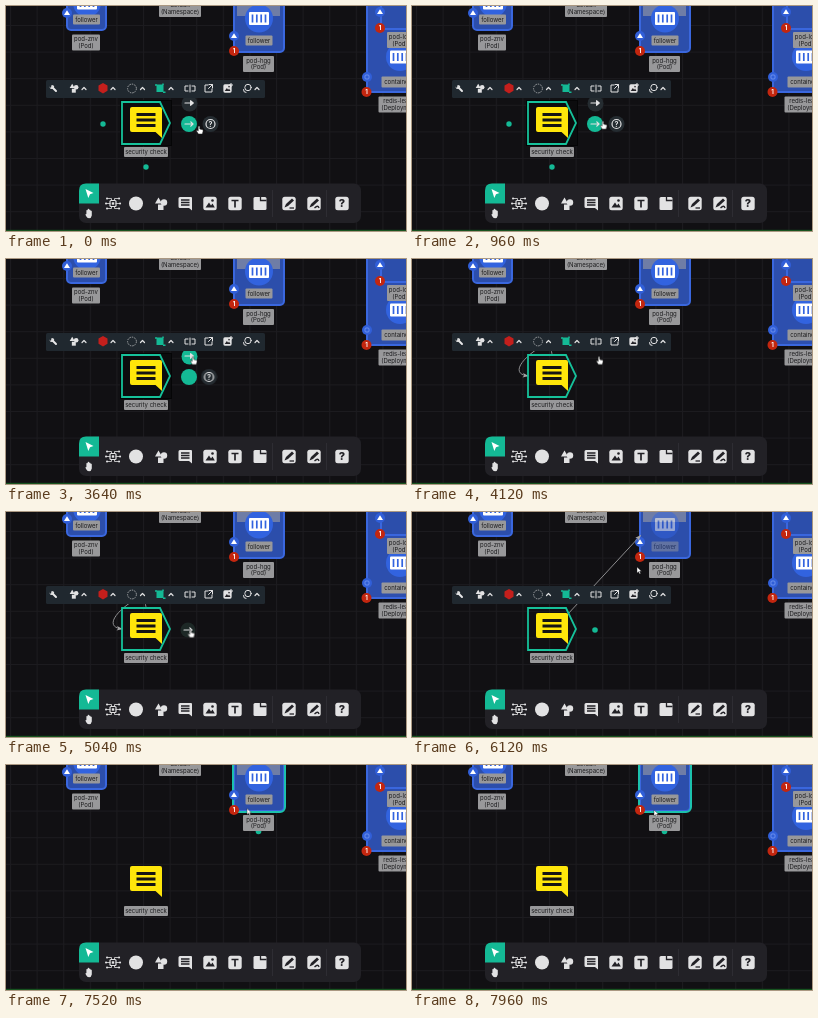
Write an HTML page that moves like this. It is 400 by 225 pixels and loops after 8000 ms.

```html
<!DOCTYPE html>
<html lang="en">
<head>
<meta charset="utf-8">
<title>Security check diagram</title>
<style>
html, body { margin: 0; width: 100%; height: 100%; overflow: hidden; background: #111013; }
svg { display: block; width: 100vw; height: 100vh; }
text { font: 6px Inter, sans-serif; fill: #1b1b1d; text-anchor: middle; }
.chip { fill: #98989a; }
.ns { fill: #2d4fae; stroke: #3a67de; stroke-width: 2; }
.pod { fill: #2c4eab; stroke: #3a67de; stroke-width: 2; }
.line { fill: none; stroke: #e2e2e3; stroke-width: 1.2; stroke-linecap: round; stroke-linejoin: round; }
.white { fill: #e2e2e3; }
.ink { fill: none; stroke: #222126; stroke-width: 1.3; }
.green { fill: #14b995; }
.dark { fill: #252c31; }
.wire { fill: none; stroke: #8d8d8f; stroke-width: 1; }

/* One 8 s timeline; hard changes use step-end */
.t { animation: 8s step-end infinite; }
.menu { animation-name: menu; }
.ends { animation-name: ends; }
.tip { animation-name: tip; }
.hover { animation-name: hover; animation-timing-function: linear; }
.arrow { animation-name: arrow; }
.help { animation-name: help; }
.loop { animation-name: loop; }
.handle { animation-name: handle; }
.dot { animation-name: dot; }
.edge { animation-name: edge, drag; animation-timing-function: step-end, linear; }
.dim { animation-name: dim; animation-timing-function: linear; }
.picked { animation-name: picked; }
.tools { animation-name: tools; }
.hand { animation-name: hand; }
.ptr { animation-name: ptr; }
.cursor { animation-name: move; animation-timing-function: ease-in-out; }

@keyframes menu { 0% { opacity: 1 } 50.5%, 100% { opacity: 0 } }
@keyframes ends { 0% { opacity: 1 } 42%, 100% { opacity: 0 } }
@keyframes tip { 0% { opacity: 0 } 14.5% { opacity: 1 } 40.5%, 100% { opacity: 0 } }
@keyframes hover { 0%, 13% { fill: #252c31 } 15%, 100% { fill: #14b995 } }
@keyframes arrow { 0% { opacity: 1 } 42%, 100% { opacity: 0 } }
@keyframes help { 0% { transform: none } 42%, 100% { transform: translate(-1.5px, 0) } }
@keyframes loop { 0% { opacity: 0 } 51% { opacity: 1 } 69%, 100% { opacity: 0 } }
@keyframes handle { 0% { opacity: 0 } 61.5% { opacity: 1 } 69%, 100% { opacity: 0 } }
@keyframes dot { 0% { opacity: 0 } 69% { opacity: 1 } 93.5%, 100% { opacity: 0 } }
@keyframes edge { 0% { opacity: 0 } 69% { opacity: 1 } 93.5%, 100% { opacity: 0 } }
@keyframes drag {
  0%, 69% { d: path("M155 103L185 118") }
  71%, 83% { d: path("M155 103L228.5 23.5") }
  84%, 100% { d: path("M155 103L241.500 22.500") }
}
@keyframes dim { 0%, 70.5% { opacity: 1 } 72%, 82% { opacity: .5 } 83.5%, 100% { opacity: 1 } }
@keyframes picked { 0% { opacity: 0 } 93.5%, 100% { opacity: 1 } }
@keyframes tools { 0% { opacity: 1 } 93.5%, 100% { opacity: 0 } }
@keyframes hand { 0% { opacity: 1 } 69%, 100% { opacity: 0 } }
@keyframes ptr { 0% { opacity: 0 } 69%, 100% { opacity: 1 } }
@keyframes move {
  0%, .5% { transform: translate(193px, 120px) }
  2%, 4.5% { transform: translate(192.5px, 119px) }
  9%, 11.5% { transform: translate(191px, 116px) }
  14.5%, 40.5% { transform: translate(187px, 101px) }
  44%, 61% { transform: translate(187px, 97.5px) }
  63%, 68.5% { transform: translate(184.5px, 117.5px) }
  71%, 73% { transform: translate(228px, 24px) }
  76.5%, 80% { transform: translate(225px, 55px) }
  87%, 90% { transform: translate(229px, 26px) }
  95%, 100% { transform: translate(242px, 45px) }
}
</style>
</head>
<body>
<svg viewBox="0 0 400 225" preserveAspectRatio="none">
  <defs>
    <pattern id="grid" width="26.6" height="26.6" patternUnits="userSpaceOnUse" x="4" y="19">
      <path d="M0 .5H26.6M.5 0V26.6" stroke="#1c1b1f" fill="none"/>
    </pattern>
    <marker id="tip" viewBox="0 0 8 8" refX="7" refY="4" markerWidth="6" markerHeight="6" orient="auto">
      <path d="M0 1L8 4L0 7L2 4Z" fill="#a5a5a7"/>
    </marker>
    <g id="box">
      <circle r="14" fill="#3263df"/>
      <rect x="-10" y="-6.5" width="20" height="13" rx="1" fill="#fff"/>
      <path d="M-6.5-4V4M-2.2-4V4M2.2-4V4M6.5-4V4" stroke="#3263df" stroke-width="1.7"/>
    </g>
    <g id="up">
      <circle r="5" fill="#315fd8"/>
      <path d="M0-2.8L3 2H-3Z" fill="#fff"/>
    </g>
    <g id="alert">
      <circle r="5" fill="#c3260f"/>
      <text y="2.1" style="font-weight:700;fill:#fff">1</text>
    </g>
    <path id="caret" class="line" d="M-2 1L0-1L2 1"/>
    <path id="right" class="line" d="M-4 0H4M1.8-2.2L4 0L1.8 2.2"/>
    <g id="shapes" class="white">
      <path d="M-2.5-6L1 0H-6Z"/>
      <circle cx="3" cy="-1" r="3.2"/>
      <rect x="-3" y="1" width="5.5" height="5.5"/>
    </g>
    <rect id="tile" class="white" x="-6.7" y="-6.7" width="13.4" height="13.4" rx="2.5"/>
    <g id="pic">
      <use href="#tile"/>
      <path d="M-4.5 4L-1-1L1 2L2.5 0L4.8 4Z" fill="#222126"/>
      <circle cx="2.5" cy="-3" r="1.3" fill="#222126"/>
    </g>
    <path id="palm" d="M-3.7 1L-2.6 .5V-3.2Q-1.9-4-1.3-3.2V-4.5Q-.6-5.2 0-4.5V-3.8Q.8-4.5 1.4-3.6V-2.8Q2.3-3.2 2.8-2.3V2Q2.3 4.8 0 4.8Q-2 4.8-2.6 3Z" class="white"/>
    <g id="pen">
      <use href="#tile"/>
      <path d="M-4.5 4L-3 .5L3-5L5-3L-1 2.5Z" fill="#222126"/>
    </g>
  </defs>

  <rect width="400" height="225" fill="#111013"/>
  <rect width="400" height="225" fill="url(#grid)"/>

  <!-- left pod -->
  <rect class="pod" x="61" y="-20" width="39" height="44" rx="4"/>
  <use href="#box" x="81" y="-3"/>
  <rect class="chip" x="67" y="8.5" width="27" height="10" rx="1"/>
  <text x="80.5" y="15.5">follower</text>
  <use href="#up" x="61" y="7"/>
  <rect class="chip" x="66" y="28.5" width="28" height="16" rx="1"/>
  <text x="80" y="35">pod-znv</text>
  <text x="80" y="41.5">(Pod)</text>

  <rect class="chip" x="153" y="-4" width="42" height="15" rx="1"/>
  <text x="174" y="1">default</text>
  <text x="174" y="7.7">(Namespace)</text>

  <!-- middle pod -->
  <rect class="pod" x="228" y="-20" width="50" height="66" rx="4"/>
  <path d="M231 0H274V10H231Z" fill="#6f7da6"/>
  <g class="t dim">
    <use href="#box" x="253" y="12.5"/>
    <rect class="chip" x="239.5" y="29.5" width="27" height="10" rx="1"/>
    <text x="253" y="36.6">follower</text>
  </g>
  <g class="t picked">
    <rect x="227" y="-20" width="52" height="67" rx="5" fill="none" stroke="#1cc1ad" stroke-width="2"/>
    <circle class="green" cx="252.5" cy="66.5" r="2.8"/>
  </g>
  <use href="#up" x="228" y="30"/>
  <use href="#alert" x="228" y="45"/>
  <rect class="chip" x="237" y="50" width="31" height="16" rx="1"/>
  <text x="252.5" y="56.5">pod-hgg</text>
  <text x="252.5" y="63.2">(Pod)</text>

  <!-- right deployment -->
  <rect class="ns" x="361" y="-20" width="70" height="106" rx="4"/>
  <rect class="pod" x="375" y="-20" width="60" height="43" rx="4"/>
  <use href="#up" x="374" y="6"/>
  <use href="#alert" x="374" y="22"/>
  <use href="#box" x="394" y="51"/>
  <rect class="chip" x="381" y="26" width="28" height="16" rx="1"/>
  <text x="394" y="33">pod-lcq</text>
  <text x="394" y="39.7">(Pod)</text>
  <rect class="chip" x="375.5" y="70.5" width="34" height="11" rx="1"/>
  <text x="391.5" y="78">container</text>
  <circle cx="361" cy="71" r="5" fill="#315fd8"/>
  <rect x="359" y="69" width="4" height="4" rx="1" fill="none" stroke="#789af0" stroke-width=".8"/>
  <use href="#alert" x="360.5" y="86"/>
  <rect class="chip" x="372.5" y="90.5" width="44" height="16" rx="1"/>
  <text x="394.500" y="97.3">redis-leader</text>
  <text x="394.500" y="104">(Deployment)</text>

  <!-- comment node -->
  <path class="t edge wire" d="M155 103L228.500 23.500" marker-end="url(#tip)"/>
  <rect class="t menu" x="114.500" y="94.500" width="51" height="45" fill="#0c0c0e" stroke="#050506"/>
  <g class="t ends green">
    <circle cx="97" cy="118" r="2.700"/>
    <circle cx="140" cy="161" r="2.700"/>
  </g>
  <path class="t loop wire" d="M140 97C140 82 128 88 121 93C108 103 100 115 116 117" marker-end="url(#tip)"/>
  <path class="t tools" d="M116 96H154L164 117L154 138H116Z" fill="none" stroke="#16c19a" stroke-width="1.800"/>
  <path d="M126 101H154Q156 101 156 103V132L149.500 126H126Q124 126 124 124V103Q124 101 126 101Z" fill="#ffe60a"/>
  <path d="M130.500 108.500H149.500M130.500 114H149.500M130.500 119.500H149.500" stroke="#141414" stroke-width="3"/>
  <rect class="chip" x="118" y="141" width="44" height="10" rx="1"/>
  <text x="140" y="148">security check</text>

  <!-- handle menu -->
  <g class="t menu">
    <circle class="t hover" cx="183.500" cy="97.500" r="8"/>
    <use href="#right" x="183" y="97"/>
    <path class="white" d="M184 94L188 97L184 100Z"/>
    <circle class="green" cx="183" cy="118" r="8"/>
    <use class="t arrow" href="#right" x="183" y="118"/>
    <g class="t help">
      <circle class="dark" cx="204.500" cy="118" r="8"/>
      <circle class="line" cx="204.500" cy="118" r="4.500"/>
      <text x="204.500" y="120.500" style="font-size:7px;font-weight:700;fill:#eee">?</text>
    </g>
  </g>
  <g class="t tip">
    <rect x="196" y="92" width="34" height="9.500" rx="1" fill="#242427"/>
    <text x="213" y="98.800" style="font-weight:500;fill:#e8e8ea">annotation</text>
  </g>
  <g class="t handle">
    <circle cx="182" cy="118" r="7.500" fill="#1d2826"/>
    <use href="#right" x="182" y="118"/>
  </g>
  <circle class="t dot green" cx="183" cy="118" r="2.800"/>

  <!-- node toolbar -->
  <g class="t tools">
    <rect x="40" y="74" width="219" height="18" rx="1.500" fill="#20282f"/>
    <path d="M46 81L50 85" stroke="#e9e9ea" stroke-width="2" stroke-linecap="round"/>
    <path class="white" d="M43.500 80.500L45 82L46.500 80.500L45 79Q48 78.500 48.300 81L46.500 83Q43.500 83.500 43.500 80.500Z"/>
    <use href="#shapes" transform="translate(68 82) scale(.72)"/>
    <path d="M97 77L101.500 79.500V84.800L97 87.500L92.500 84.800V79.500Z" fill="#c41f1c"/>
    <circle cx="126" cy="82.500" r="4.400" fill="none" stroke="#a3a6a8" stroke-dasharray="1.500 1"/>
    <path class="green" d="M150.500 78.500H157.500V85.500H159.500V87H157V86H150.500Z"/>
    <path d="M149 79H151M157 77.500V79" stroke="#14b995" stroke-width="1.500"/>
    <path class="line" d="M182 80H179V85H182M186 80H189V85H186M184 79V86" style="stroke-width:1"/>
    <path class="line" d="M202 79H199V86H206V83M203 78.500H206.500V82M206.500 78.500L202.500 82.500" style="stroke-width:1"/>
    <use href="#pic" transform="translate(221.500 82.500) scale(.62)"/>
    <path d="M223 79H227M225 77V81" stroke="#e9e9ea"/>
    <circle class="line" cx="242" cy="81.500" r="3.200" style="stroke-width:1"/>
    <path class="line" d="M237.500 83.500Q237 86.500 240 86.500" style="stroke-width:1"/>
    <use href="#caret" x="78" y="82.500"/>
    <use href="#caret" x="107" y="82.500"/>
    <use href="#caret" x="136.500" y="82.500"/>
    <use href="#caret" x="165" y="82.500"/>
    <use href="#caret" x="251" y="82.500"/>
  </g>

  <!-- dock -->
  <rect x="73" y="177.500" width="282" height="39.500" rx="7" fill="#222126"/>
  <path class="green" d="M80 177.500H93V197.500H73V184.500Q73 177.500 80 177.500Z"/>
  <path d="M79.500 183L87.500 187L84 188.300L82.300 192Z" fill="#fff"/>
  <use href="#palm" x="83" y="207.500"/>
  <g transform="translate(107 197.500)">
    <rect class="line" x="-3" y="-3" width="6" height="6" rx="1"/>
    <rect class="white" x="-1.200" y="-1.200" width="2.400" height="2.400"/>
    <path class="line" d="M-1.500-3V-5H-5M1.500-3V-5H5M-1.500 3V5H-5M1.500 3V5H5M-3 0H-6.500M3 0H6.500" style="stroke-width:.8"/>
    <path class="line" d="M-6-5H-5.900M6-5H6.100M-6 5H-5.900M6 5H6.100M-7 0H-6.900M7 0H7.100" style="stroke-width:2"/>
  </g>
  <circle class="white" cx="130" cy="197.500" r="7"/>
  <use href="#shapes" x="155" y="197.500"/>
  <path class="white" d="M174 191H185Q186 191 186 192V204.500L183 202H174Q172.500 202 172.500 200.500V192.500Q172.500 191 174 191Z"/>
  <path class="ink" d="M175 194H183.500M175 196.500H183.500M175 199H183.500"/>
  <use href="#pic" x="204" y="197.500"/>
  <use href="#tile" x="229" y="197.500"/>
  <path class="ink" d="M225.500 194.500H232.500M229 194.500V201.500" style="stroke-width:1.700"/>
  <path class="white" d="M249 191H259Q260.500 191 260.500 192.500V202.500Q260.500 204 259 204H249Q247.500 204 247.500 202.500V192.500Q247.500 191 249 191Z"/>
  <path class="ink" d="M254.500 191V194.500H260.500"/>
  <path d="M266.500 184V211M320.500 184V211" stroke="#2e2d33"/>
  <use href="#pen" x="283" y="197.500"/>
  <path class="ink" d="M283.500 202H288"/>
  <use href="#pen" x="308" y="197.500"/>
  <path class="ink" d="M308.500 202Q312 198.500 313 202"/>
  <use href="#tile" x="336" y="197.500"/>
  <text x="336" y="201.300" style="font-size:11px;font-weight:800;fill:#222126">?</text>

  <rect y="223.800" width="400" height="1.200" fill="#17531f"/>

  <g class="t cursor">
    <path class="t hand" d="M-.8 .6Q0-.4 .8 .6V3L3.800 3.800Q4.300 4.200 4 5.500L3.300 8H-.6L-2.500 5Q-2.500 4-1.600 4.300L-.8 5Z" fill="#fff" stroke="#222" stroke-width=".5"/>
    <path class="t ptr" d="M0 0V6L1.500 4.700L2.600 7L3.600 6.500L2.600 4.300H4.500Z" fill="#fff" stroke="#222" stroke-width=".4"/>
  </g>
</svg>
</body>
</html>
```
